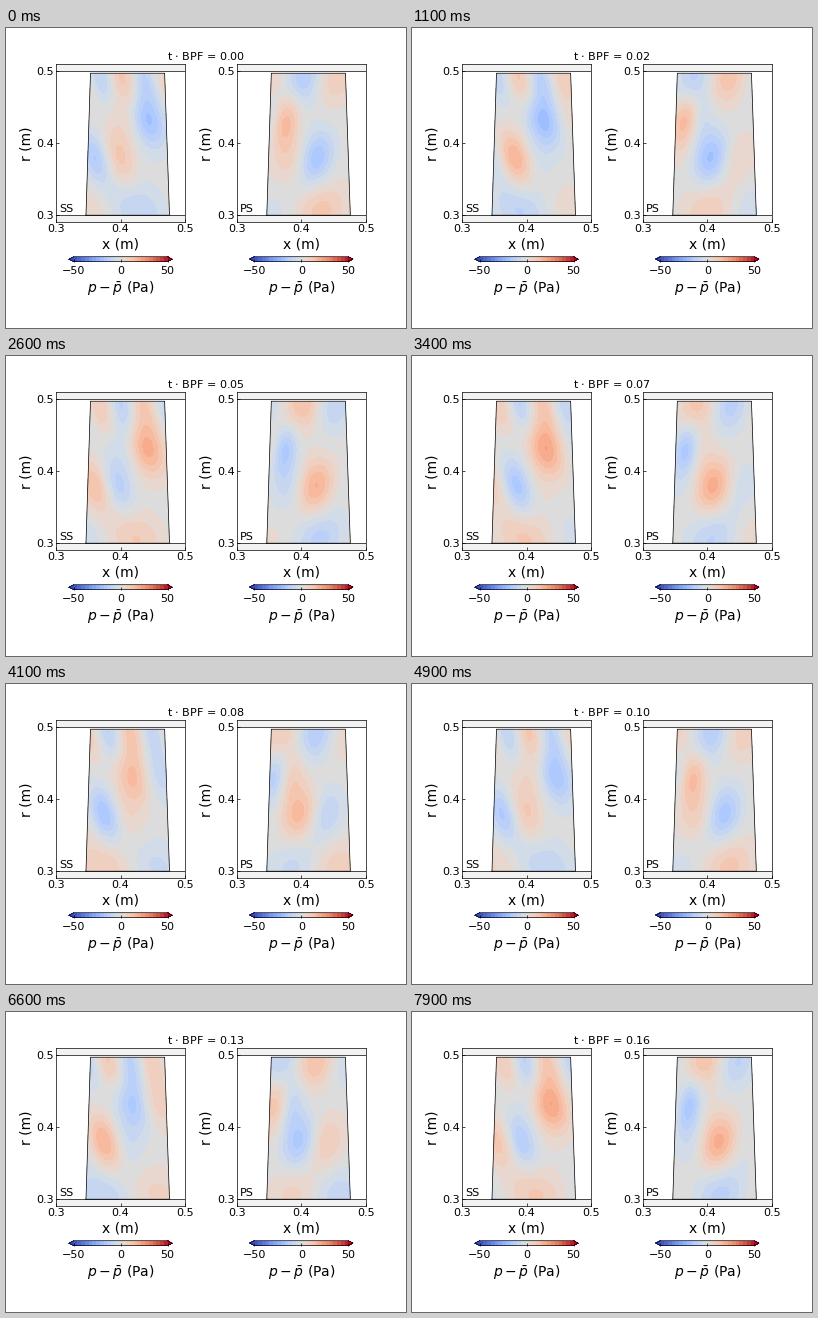
Write a matplotlib script that moves like this. It is 400 px wide and 300 px high and loops after 8000 ms.

```python
import numpy as np
import matplotlib.pyplot as plt
from matplotlib.animation import FuncAnimation

W, H = 400, 300
FRAMES, STEP = 80, 100
PERIOD = 50          # frames per pressure cycle
DT = 0.002           # blade passing periods per frame
LEVELS = np.linspace(-50, 50, 26)

PANEL_W, PANEL_H, TOP = 310 / 2.4, 158.4, 36
ROWS = 50, 93, 130, 182          # heights of the wave packets, tip to hub
ROW_H = 19

plt.rcParams.update({
    "font.family": "DejaVu Sans",
    "font.size": 8,
    "axes.linewidth": 0.5,
    "xtick.direction": "in",
    "ytick.direction": "in",
    "xtick.major.width": 0.5,
    "ytick.major.width": 0.5,
    "xtick.major.size": 2,
    "ytick.major.size": 2,
})

# Blade surface grid between leading and trailing edge
u, v = np.meshgrid(np.linspace(0, 1, 90), np.linspace(0, 1, 100))
lead = 0.3464 + 0.0070 * v
trail = 0.4757 - 0.0075 * v
X = lead + (trail - lead) * u
R = 0.3 + 0.1972 * v
PX = 50 + (X - 0.3) * PANEL_W / 0.2
PY = TOP + (0.51 - R) * PANEL_H / 0.22


def wave_mode(slant, packets):
    """Complex amplitude of upstream-running packets, one per row.

    Each packet is (amplitude, centre, width, wavelength, phase at centre).
    """
    mode = 0
    for y, (amp, xc, width, length, phase) in zip(ROWS, packets):
        dy = PY - y
        dx = PX - xc - slant * dy
        envelope = amp * np.exp(-((dx / width) ** 2 + (dy / ROW_H) ** 2) / 2)
        mode = mode + envelope * np.exp(2j * np.pi * (dx / length - phase))
    return mode


SUCTION = wave_mode(0.22, [(11, 115, 50, 45, .04), (22, 136, 16, 110, .63),
                           (18, 99, 18, 72, .30), (11, 118, 40, 140, .63)])
PRESSURE = wave_mode(-0.15, [(14, 120, 35, 79, .44), (17, 95, 13, 70, .12),
                             (20, 123, 19, 92, .63), (12, 130, 30, 135, .05)])


def box(x, y, w, h):
    return fig.add_axes([x / W, 1 - (y + h) / H, w / W, h / H])


def label(x, y, s, size=10, **kw):
    return fig.text(x / W, 1 - y / H, s, size=size,
                    ha="center", va="center", **kw)


def fill(ax, mode, i):
    p = (mode * np.exp(2j * np.pi * i / PERIOD)).real
    return ax.contourf(X, R, p, LEVELS, cmap="coolwarm",
                       extend="both", zorder=1)


def make_panel(x0, name, mode):
    ax = box(x0, TOP, PANEL_W, PANEL_H)
    ax.set(xlim=(0.3, 0.5), ylim=(0.29, 0.51),
           xticks=[0.3, 0.4, 0.5], yticks=[0.3, 0.4, 0.5])
    ax.tick_params(pad=1.5)
    for wall, edge in ((0.3, 0.29), (0.5, 0.51)):
        ax.axhspan(min(wall, edge), max(wall, edge), color="0.95", lw=0)
        ax.axhline(wall, color="k", lw=0.5)
    outline = [0, 0, -1, -1, 0], [0, -1, -1, 0, 0]
    ax.plot(X[outline], R[outline], color="k", lw=0.5, zorder=3)
    ax.text(0.305, 0.305, name)

    contours = fill(ax, mode, 0)
    cax = box(x0 + 0.1 * PANEL_W, 228.7, 0.8 * PANEL_W, 4.8)
    bar = fig.colorbar(contours, cax=cax, orientation="horizontal",
                       ticks=[-50, 0, 50])
    bar.outline.set_linewidth(0.5)
    cax.tick_params(pad=3.5)

    mid = x0 + PANEL_W / 2
    label(mid, 216, "x (m)")
    label(x0 - 29.9, 115.5, "r (m)", rotation=90)
    label(mid, 260, r"$p - \bar{p}$ (Pa)")
    return [ax, mode, contours]


fig = plt.figure(figsize=(W / 100, H / 100), dpi=100, facecolor="white")
panels = [make_panel(50, "SS", SUCTION),
          make_panel(50 + 1.4 * PANEL_W, "PS", PRESSURE)]
title = label(200, 27.8, "", size=8)


def update(i):
    for panel in panels:
        ax, mode, old = panel
        old.remove()
        panel[2] = fill(ax, mode, i)
    title.set_text(rf"t $\cdot$ BPF = {i * DT:.2f}")
    return []


anim = FuncAnimation(fig, update, frames=FRAMES, interval=STEP,
                     init_func=lambda: update(0), repeat=True, repeat_delay=0)
plt.show()
```
